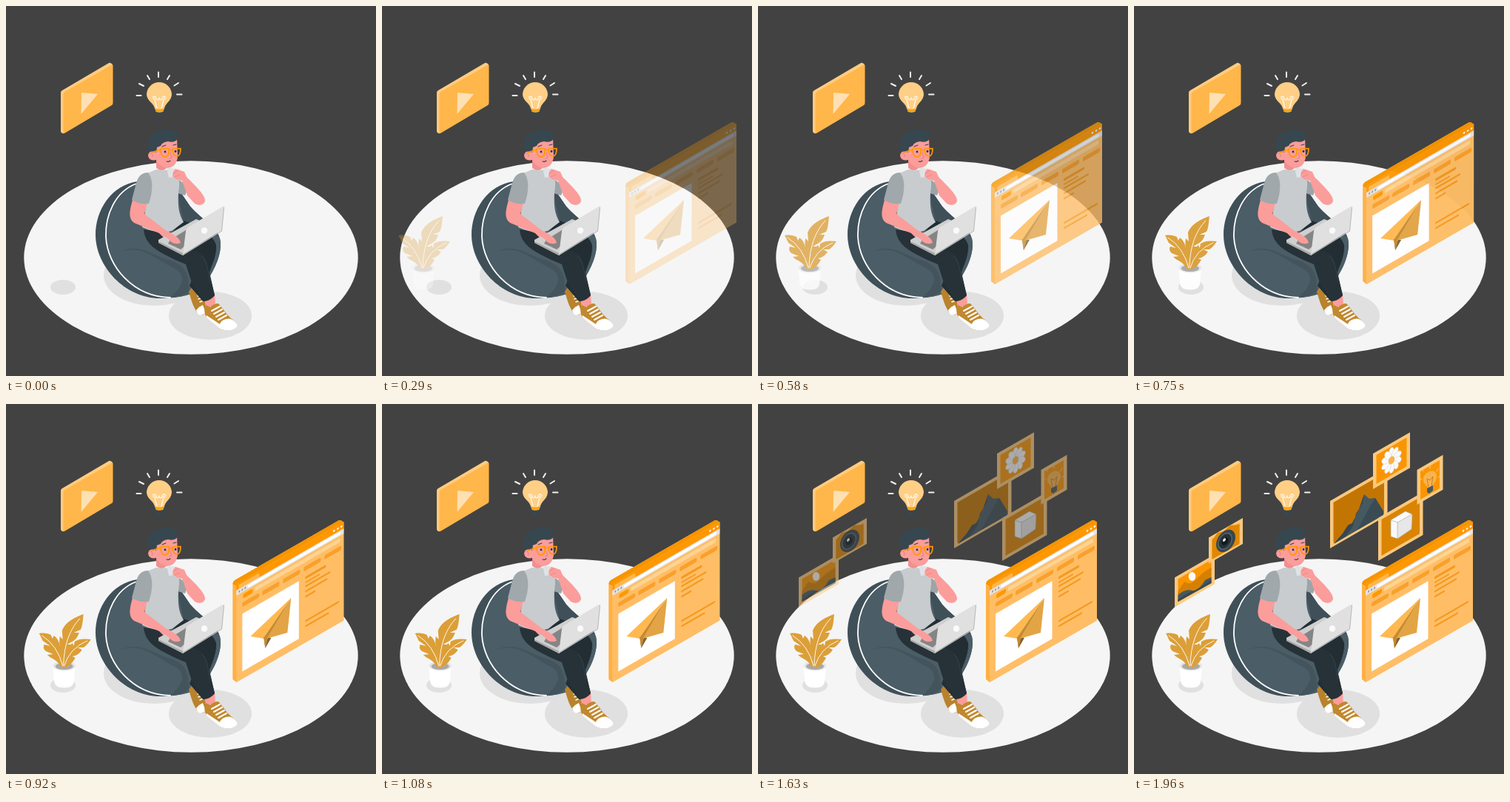
An HTML page for the animation above (2000 ms loop, 500 px wide and 500 px high).

```html
<!DOCTYPE html>
<html lang="en">
<head>
<meta charset="utf-8">
<title>Thinking about ideas</title>
<style>
html, body { margin: 0; width: 100%; height: 100%; overflow: hidden; background: #424242; }
svg { display: block; width: 100vw; height: 100vh; }
</style>
</head>
<body>
<svg viewBox="0 0 500 500" stroke-linecap="round" stroke-linejoin="round">
  <ellipse cx="250" cy="340" rx="225.700" ry="130.700" fill="#f5f5f5"/>
  <g fill="#e0e0e0">
    <ellipse cx="77" cy="380" rx="17" ry="10"/>
    <ellipse cx="200" cy="364" rx="68" ry="41"/>
    <ellipse cx="276" cy="418.500" rx="56" ry="32.500"/>
  </g>

  <g id="video">
    <path d="M74 117q0-2 2-3L139 77q2-1 5 2V133L78 172q-2 1-4-2z" fill="#ffcc80"/>
    <path d="M77.500 119q0-2 2-3L143 79.500q1.500-.5 1.500 1V131q0 2-1.500 3L79 172q-1.500 0-1.500-1.500z" fill="#ffb64a"/>
    <path d="M102 117L124 119L101.500 146z" fill="#ffe0b2"/>
  </g>

  <g id="bulb">
    <path d="M206 89.500V96M191 94L194 99M221 94L218 99M180 105L186 108M233 104L227.500 107.500M176.500 121H182.500M231 119.500H237.500" stroke="#f0f0f0" stroke-width="2"/>
    <path d="M190 120A17 17 0 1 1 224 120C223 129 215 131 213.500 140Q207 143 201.500 140C200 131 191 129 190 120z" fill="#ffcf86"/>
    <path d="M204 139L201 126M210 139L213 126M201 126q-4-2-1-4q3 0 3 4q4 2 4-2q0 4 4 2q0-4 3-4q3 2-1 4" fill="none" stroke="#fff3e0" stroke-width="1.500"/>
    <path d="M202 138q5.500 3 11 0V143q-5.500 3-11 0z" fill="#ffa31a"/>
    <path d="M201 142Q207 146 214 142L213.500 147Q207 154 202 147z" fill="#37474f"/>
  </g>

  <g id="beanbag">
    <path d="M178 237C142 242 121 276 121 309C121 352 161 395 208 395C244 395 264 386 275 366C288 345 292 327 289 314C283 298 262 286 249 271L236 252L200 238z" fill="#3f5059"/>
    <path d="M178 239C151 251 135 282 135 312C137 352 172 393 222 394C248 393 264 386 275 366C288 345 292 327 289 314C283 298 262 286 249 271L236 252z" fill="#4b5d66"/>
    <path d="M232 252H236L249 271C262 286 283 298 288 311L270 308L240 293z" fill="#3f5059"/>
    <path d="M155 332C180 320 196 336 220 343C240 350 248 358 247 386C240 391 230 394 222 394C240 378 244 364 228 355C202 342 184 322 155 332z" fill="#43545d"/>
    <path d="M175 240.500C148 251 134 282 135 312C137 352 172 393 222 394" fill="none" stroke="#fff" stroke-width="1.800"/>
  </g>

  <g id="shoes">
    <path d="M253 377L247 386C250 396 252 404 257 412Q261 419 268 417L272 406L268 390z" fill="#b9822d"/>
    <path d="M257 411q4-5 9-7l4 11q-7 5-11 1z" fill="#fff"/>
    <path d="M259 392l4-2M260 396l5-2M262 400l5-2" stroke="#fff" stroke-width="1.500"/>
    <path d="M268 394L270 408L283 405L282 389z" fill="#fb9d9b"/>
    <path d="M270 404C267 411 268 418 273 422L289 436C299 441 313 437 312 430C308 424 300 420 296 413L287 402Q281 402 276 407z" fill="#c1882f"/>
    <path d="M289 430C290 424 300 421 304 423Q312 427 312.500 432C310 439 297 440 289 436L271 421V418z" fill="#fff"/>
    <path d="M278 412L289 406M281 416L292 410M284 420L295 414M287 424L298 418" stroke="#fff" stroke-width="2"/>
  </g>

  <g id="legs">
    <path d="M238 290C252 292 280 308 284 323C285 338 278 350 275 360L282 391Q275 398 266 399L248 378L262 345L215 318z" fill="#222e34"/>
    <path d="M186 302C188 322 202 332 243 349L251 374L267 399Q277 398 282 391L271 347C270 338 263 333 250 329L218 306z" fill="#263238"/>
    <path d="M264 338C272 344 272 354 276 372" fill="none" stroke="#37474f" stroke-width=".8"/>
  </g>

  <g id="torso">
    <path d="M231 234Q241 237 245 248L242 256L232 253z" fill="#9da4a7"/>
    <path d="M203 221L191 226C186 242 193 270 184 299Q206 309 224 304L240 292C234 282 232 272 233 252C235 240 235 228 228 222z" fill="#c8cccf"/>
    <path d="M203 208V219Q211 225 217 219V210z" fill="#f28f8f"/>
    <path d="M217 218L229 220L227 231L220 232z" fill="#dfe3e5"/>
    <path d="M171 262C166 280 166 287 173 293L207 307L216 316Q222 323 234 321C237 317 229 308 217 304L187 281L191 266z" fill="#fb9d9b"/>
    <path d="M192 225C181 226 178 231 175 243L170 262Q180 269 193 267C199 250 199 234 192 225z" fill="#a1a8ab"/>
    <path d="M229 220L226 224L225 230L230 234L238 236L245 256L255 267Q265 272 269 264C270 256 257 244 244 231L241 224z" fill="#fb9d9b"/>
    <path d="M226 226L233 222M228 231L235 228" stroke="#ea8585" stroke-width=".8"/>
  </g>

  <g id="head">
    <path d="M201 183L231 178L232 204Q230 218 218 219Q207 217 203 208Q193 210 192 202Q193 195 201 197z" fill="#fb9d9b"/>
    <path d="M193 198C188 187 193 176 200 172C209 165 225 166 231 172Q233 177 231 181Q227 185 219 183Q211 184 209 189L204 191L203 198Q196 192 193 198z" fill="#37474f"/>
    <path d="M195 199q4 1 3 5M222 198l2 7-3 1" fill="none" stroke="#e67e80" stroke-width="1"/>
    <path d="M217 210q3 1 5-1M211 190l5-2M226 188l4-1" fill="none" stroke="#37474f" stroke-width="1.100"/>
    <circle cx="215" cy="197" r="1.400" fill="#263238"/>
    <circle cx="229" cy="196.500" r="1.400" fill="#263238"/>
    <path d="M197 198L209 194M220 195l5-1M209 193l11-.5q1 11-5 11.500-6 0-6-11zM225 193l11-.5q0 10-5 10.500-6 0-6-10z" fill="none" stroke="#ff9800" stroke-width="1.700"/>
  </g>

  <g id="laptop">
    <path d="M206 316L257 288L262 290L241 333L239 337L206 320z" fill="#cfcfcf"/>
    <path d="M206 318L239 334V337L206 320z" fill="#a8a8a8"/>
    <path d="M222 316L254 296L242 324L236 329L219 321z" fill="#858585"/>
    <path d="M211 309L220 315Q226 324 236 320Q234 311 218 305z" fill="#fb9d9b"/>
    <path d="M243 304Q243 301 246 299L292 271.500Q295 270 294.500 273L291.500 303L239 336z" fill="#e0e0e0"/>
    <path d="M294.500 272L291.500 304L239 336.500" fill="none" stroke="#bdbdbd" stroke-width="1.200"/>
    <circle cx="268" cy="303.500" r="4.200" fill="#fafafa"/>
  </g>

  <g id="plant">
    <path d="M61.500 354L63.500 376Q65 383.500 77 383.500T90 376L92 354z" fill="#fff"/>
    <ellipse cx="77" cy="354" rx="15.300" ry="6.500" fill="#e6e6e6"/>
    <ellipse cx="77" cy="354.500" rx="12" ry="4.500" fill="#a9a9a9"/>
    <g fill="#dc9f38">
      <path d="M75 350C73 338 69 326 71 314L75 318L74 306C79 294 92 288 103 284C102 292 102 300 99 305L90 309L97 309C95 316 91 320 86 322L81 325L86 325C83 335 80 343 77 355z"/>
      <path d="M72 355C68 345 60 345 54 339L62 338L52 334C48 330 49 327 50 325L58 327L48 320C46 316 45 313 43 310C50 309 55 310 59 312L61 317L63 313C69 317 71 324 72 332L76 356z"/>
      <path d="M77 356C78 340 80 330 88 323L90 327L91 321C97 317 105 317 113 318C110 323 106 327 103 329L95 329L101 332C98 337 94 340 88 341L92 343C88 350 84 354 79 356z"/>
    </g>
    <path d="M98 290Q77 312 76 353M47 313Q68 326 75 354M108 320Q84 330 77 354" fill="none" stroke="#fff" stroke-width=".9"/>
  </g>

  <g id="browser">
    <path d="M308 243Q308 240 311 238L451 157.500Q454 156 458 160V292.500L313 376L308 372z" fill="#ffb044"/>
    <path d="M308 243Q308 240 311 238L451 157.500Q454 156 458 160L313 246z" fill="#f79400"/>
    <g id="page" transform="matrix(1 -.577 0 1 313 243)"></g>
    <path d="M387 262L332 314L350 317z" fill="#ffb950"/>
    <path d="M350 315L352 330L360 316z" fill="#80632f"/>
    <path d="M387 262L350 316L352 330L356 315z" fill="#c48a33"/>
    <path d="M387 262L354 317L382 309z" fill="#e3a445"/>
  </g>

  <g id="photos"></g>
</svg>
<script>
const LOOP = 2000;
const byId = id => document.getElementById(id);
const rect = (x, y, w, h, fill, r = 0) =>
  `<rect x="${x}" y="${y}" width="${w}" height="${h}" rx="${r}" fill="${fill}"/>`;
const path = (d, fill, extra = "") => `<path d="${d}" fill="${fill}" ${extra}/>`;

function buildPage() {
  const pills = [8, 35, 63, 91, 119].map(x => rect(x, 30, 23, 6, "#f9a02c", 1.5));
  const dots = [132, 137, 142].map(x => `<circle cx="${x}" cy="4.5" r="1.3" fill="#fff"/>`);
  const lines = [[44, 28, 3.5], [51, 20, 2], [56, 34, 2.5], [63, 30, 2.5], [70, 14, 2.5], [103, 46, 2.5], [110, 32, 2.5]]
    .map(([y, w, h]) => rect(93, y, w, h, "#f59a1f", 1));
  byId("page").innerHTML = [
    rect(0, 0, 145, 133, "#ffbe66"),
    rect(0, 0, 145, 9.5, "#ff9800"),
    rect(3, 3, 28, 7, "#ffb74d", 1.5),
    rect(0, 9, 145, 7, "#e4e4e4"),
    rect(15, 10.5, 126, 4, "#fff", 2),
    ...[3, 7, 11].map(x => rect(x, 11, 2, 3, "#9e9e9e", 1)),
    rect(9, 19, 13, 6, "#ff9800", 2),
    rect(25, 19, 115, 5.5, "#ffd391", 1),
    rect(8, 45, 76.5, 78, "#fff"),
    ...pills, ...dots, ...lines
  ].join("");
}

// Isometric picture frame; the art is drawn in stage coordinates.
function photo(x, y, w, h, fill, art) {
  return `<g transform="matrix(1 -.577 0 1 ${x} ${y})">${rect(0, 0, w, h, "#ffcc80")}` +
    `${rect(4.5, 4.5, w - 9, h - 9, fill)}</g>${art}`;
}

function flower() {
  let petals = "";
  for (let a = 0; a < 360; a += 36)
    petals += `<ellipse cy="-9.5" rx="4.2" ry="6.5" fill="#fff" stroke="#d5d5d5" stroke-width=".5" transform="rotate(${a})"/>`;
  return `<g transform="matrix(.87 -.4 0 1.08 348 76)">${petals}<circle r="4.8" fill="#ffb74d"/></g>`;
}

function buildPhotos() {
  const mountains =
    path("M270 189L282 175L289 164L295 161L303 145L311 122L318 128L326 127L337 145V150z", "#455a64") +
    path("M311 122L309 134L300 148L296 165L286 179L270 189L282 175L289 164L295 161L303 145z", "#37474f") +
    path("M326 127L318 140L311 153L302 170L337 150V145z", "#3b4c55");
  const cube =
    path("M347 157L367 145L376 149L375 169L356 182L347 179z", "#fff") +
    path("M356 160L376 149L375 169L356 182z", "#ececec") +
    path("M347 157L356 160L376 149M356 160V182M347 157V179L356 182L375 169L376 149L367 145z", "none",
      'stroke="#a6a6a6" stroke-width=".6"');
  const smallBulb =
    path("M389 101L386 103M391 91L389 88M400 87V83M409 91L411 87M411 99L414 97", "none", 'stroke="#ffcc80" stroke-width="1"') +
    path("M391 102C391 91 408 85 409 97C409 105 404 107 403 113L397 115C396 108 391 109 391 102z", "#ffb74d") +
    path("M398 113L396 101L400 103L404 98L402 111", "none", 'stroke="#b87720" stroke-width=".8"') +
    path("M396 114L404 110V117L399 121L396 119z", "#455a64");
  const lens =
    path("M105.500 184L113 174L121 172L130 164L142.500 163V189L105.500 210z", "#e68900") +
    `<g transform="matrix(1 -.4 0 1.1 124 185)"><circle r="13" fill="#37474f"/>` +
    `<circle cx="-1" r="10" fill="#546670"/><circle cx="-1" r="8.5" fill="#263238"/>` +
    `<circle cx="-1" r="4.5" fill="#10181c"/><circle cx="-2" cy="-2" r="2" fill="#fff"/></g>`;
  const dunes =
    path("M59.500 253L68 240Q76 246 84 237T104.500 221V242L59.500 267z", "#d98200") +
    path("M59.500 258Q70 249 78 252T96 238L104.500 234V242L59.500 267z", "#455a64") +
    path("M59.500 264Q74 254 84 251L104.500 238V242L59.500 267z", "#37474f") +
    '<ellipse cx="78.500" cy="233" rx="4.800" ry="6" fill="#fff"/>';
  byId("photos").innerHTML =
    photo(265, 131, 77.5, 64, "#c77700", mountains) +
    photo(330, 154, 60.5, 58, "#e08600", cube) +
    photo(323, 67, 50, 48, "#ff9800", flower()) +
    photo(382.5, 89, 35, 47, "#ff9800", smallBulb) +
    photo(55, 234.5, 54, 40, "#ff9800", dunes) +
    photo(101, 180.5, 46, 35, "#ff9800", lens);
}

const clamp = v => Math.min(1, Math.max(0, v));
const cubic = (a, b, s) => 3 * (1 - s) ** 2 * s * a + 3 * (1 - s) * s * s * b + s ** 3;

// cubic-bezier(.36, -.01, .5, 1.38): slow start, slight overshoot
function overshoot(x) {
  let low = 0, high = 1;
  for (let i = 0; i < 24; i++) {
    const mid = (low + high) / 2;
    if (cubic(.36, .5, mid) < x) low = mid; else high = mid;
  }
  return cubic(-.01, 1.38, low);
}

function slide(id, from, progress, visible) {
  const node = byId(id);
  node.setAttribute("transform", `translate(${from * (1 - progress)} 0)`);
  node.setAttribute("opacity", visible ? clamp(progress) : 0);
}

function render(t) {
  const progress = overshoot(clamp((t + 85) / 1300));
  slide("plant", -30, progress, t >= 80);
  slide("browser", 30, progress, t >= 80);
  byId("photos").setAttribute("opacity", clamp((t - 1190) / 790));
}

buildPage();
buildPhotos();
const start = performance.now();
function tick() {
  render((performance.now() - start) % LOOP);
  requestAnimationFrame(tick);
}
tick();
</script>
</body>
</html>
```
